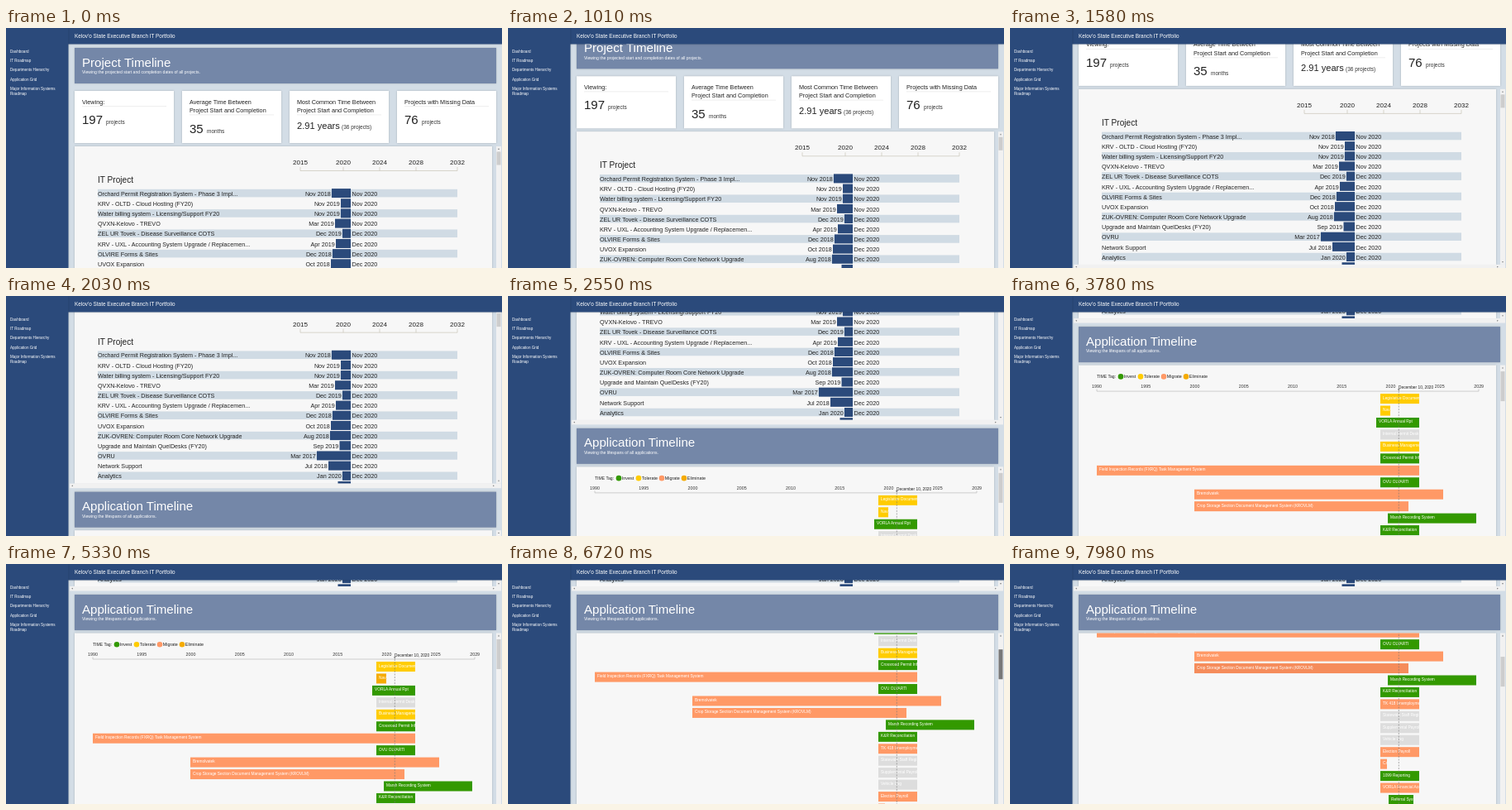
Recreate the animation shown at these times as an HTML page. Size 600 by 290 pixels, loop 8000 ms.

```html
<!DOCTYPE html>
<html lang="en">
<head>
<meta charset="utf-8">
<title>Portfolio timeline</title>
<style>
html, body { margin: 0; width: 600px; height: 290px; overflow: hidden; background: #d3dde6; }
svg { display: block; font-family: "Liberation Sans", Arial, sans-serif; }
.card { filter: drop-shadow(0 .6px .8px #0003); }
</style>
</head>
<body>
<svg id="stage" width="600" height="290" viewBox="0 0 600 290"></svg>
<script>
const NAVY = '#2b4a7b', INK = '#222', PALE = '#d0dbe4', THUMB = '#cdcdcd';
const GREEN = '#339900', YELLOW = '#ffcc00', ORANGE = '#ff9966', GREY = '#dddddd', AMBER = '#f5ab00';

const esc = s => s.replace(/&/g, '&amp;');
const rect = (x, y, w, h, fill, extra = '') =>
  `<rect x="${x}" y="${y}" width="${w}" height="${h}" fill="${fill}" ${extra}/>`;
const text = (x, y, size, s, fill = INK, anchor = 'start') =>
  `<text x="${x}" y="${y}" font-size="${size}" fill="${fill}" text-anchor="${anchor}">${esc(s)}</text>`;
const path = (d, stroke, width = .7, extra = '') =>
  `<path d="${d}" fill="none" stroke="${stroke}" stroke-width="${width}" ${extra}/>`;
const tri = (x, y, dx, dy) => // arrowhead pointing along (dx, dy)
  `<path d="M${x + dx} ${y + dy}L${x - dx + dy} ${y - dy + dx}L${x - dx - dy} ${y - dy - dx}z" fill="#777"/>`;
const clip = (x, y, w, h, body, vy = y) =>
  `<svg x="${x}" y="${y}" width="${w}" height="${h}" viewBox="${x} ${vy} ${w} ${h}">${body}</svg>`;

function banner(y, title, sub) {
  return rect(83, y, 510, 43, '#7487a8', 'class="card"') +
    text(92, y + 22.6, 15.1, title, '#fff') + text(92, y + 31.4, 5.12, sub, '#fff');
}

function card(x, lines, big, size, unit, gap) {
  const end = 91.6 + 10.3 * (lines.length - 1), base = end + (size < 15 ? 19.6 : 24.6);
  return rect(x, 76, 120, 63, '#fff', 'class="card"') +
    lines.map((s, i) => text(x + 9, 91.6 + 10.3 * i, 7.25, s)).join('') +
    path(`M${x + 9} ${end + 3}h102`, '#ddd', .5) +
    text(x + 9, base, size, big) + text(x + gap, base, 6.5, unit, '#333');
}

const projects = [
  ['Orchard Permit Registration System - Phase 3 Impl...', 'Nov 2018', 394],
  ['KRV - OLTD - Cloud Hosting (FY20)', 'Nov 2019', 405],
  ['Water billing system - Licensing/Support FY20', 'Nov 2019', 405],
  ['QVXN-Kelovo - TREVO', 'Mar 2019', 398],
  ['ZEL UR Tovek - Disease Surveillance COTS', 'Dec 2019', 407],
  ['KRV - UXL - Accounting System Upgrade / Replacemen...', 'Apr 2019', 399],
  ['OLVIRE Forms & Sites', 'Dec 2018', 395],
  ['UVOX Expansion', 'Oct 2018', 393],
  ['ZUK-OVREN: Computer Room Core Network Upgrade', 'Aug 2018', 392],
  ['Upgrade and Maintain QuelDesks (FY20)', 'Sep 2019', 403.5],
  ['OVRU', 'Mar 2017', 376],
  ['Network Support', 'Jul 2018', 390],
  ['Analytics', 'Jan 2020', 407],
  ['Data Services', 'Jul 2019', 401.5]
];

function projectChart() {
  const ticks = [[2015, 356], [2020, 408], [2024, 452], [2028, 496], [2032, 546]];
  let out = rect(83, 143, 505, 212, '#f7f7f7') + text(111, 186.9, 10.1, 'IT Project') +
    path('M356 172.5H546', '#c9c5b8') +
    ticks.map(([y, x]) => text(x, 165, 8.1, y + '', INK, 'middle') + path(`M${x} 168v4.5`, '#c9c5b8')).join('');
  projects.forEach(([name, start, x], i) => {
    const y = 194.8 + 12.17 * i;
    if (i % 2 == 0) out += rect(111, y, 435, 9.6, PALE);
    out += rect(x, y - .7, 417 - x, 11, NAVY) + text(111, y + 8, 7.2, name) +
      text(x - 1.3, y + 8, 7.2, start, INK, 'end') +
      text(418.5, y + 8, 7.2, i < 4 ? 'Nov 2020' : 'Dec 2020');
  });
  return out;
}

const apps = [
  ['Legislative Documents', YELLOW, 448, 495],
  ['Nav Log', YELLOW, 448, 460],
  ['VORLA Annual Rpt', GREEN, 443, 495],
  ['Internal Permit Desk', GREY, 448, 495],
  ['Business Management', YELLOW, 448, 495],
  ['Crossroad Permit Info', GREEN, 448, 495],
  ['Field Inspection Records (FXRQ) Task Management System', ORANGE, 105, 495],
  ['OVU OLVARTI', GREEN, 448, 495],
  ['Bremolvatek', ORANGE, 223, 524],
  ['Crop Storage Section Document Management System (KROVLM)', ORANGE, 223, 482],
  ['Marsh Recording System', GREEN, 457, 564],
  ['K&R Reconciliation', GREEN, 448, 495],
  ['TK 418 Unemployment', ORANGE, 448, 495],
  ['Statewide Staff Register', GREY, 448, 495],
  ['Supplemental Payroll', GREY, 448, 495],
  ['Vehicle Log', GREY, 448, 495],
  ['Election Payroll', ORANGE, 448, 495],
  ['Calls', ORANGE, 448, 456],
  ['1099 Reporting', GREEN, 448, 495],
  ['VORLA Financial Acct', ORANGE, 448, 495],
  ['Referral System', GREEN, 458, 488],
  ['Asset Records', GREEN, 448, 495]
];

function appChart() {
  const tags = [['Invest', GREEN, 134], ['Tolerate', YELLOW, 158], ['Migrate', ORANGE, 186], ['Eliminate', AMBER, 213]];
  const ticks = [1990, 1995, 2000, 2005, 2010, 2015, 2020, 2025, 2029];
  let out = text(105, 99.2, 5.1, 'TIME Tag:') +
    tags.map(([s, c, x]) => `<circle cx="${x}" cy="97.3" r="3.3" fill="${c}"/>` + text(x + 3.8, 99.2, 5.4, s)).join('') +
    path('M105 112.5V115H567V112.5', '#bbb') +
    ticks.map(y => text(105 + (y - 1990) * 11.85, 111.2, 5.3, y + '', '#333', 'middle')).join('') +
    text(470, 111.8, 4.8, 'December 10, 2020');
  apps.forEach(([name, color, a, b], i) => {
    const y = 118 + 14.45 * i;
    out += rect(a, y, b - a, 12, color, `id="app${i}"`) +
      clip(a, y, b - a, 12, text(a + 3, y + 6.5, 4.8, name, '#fff'));
  });
  return out + path('M470.3 115V600', '#777', .6, 'stroke-dasharray="2 1.5"') + tri(470.3, 113.5, 0, 1.3);
}

// Scrollbar gutter on the right of a panel whose top is at y
const bar = (y, h) => rect(593, y, 6, h, '#f1f1f1') + tri(596, y + 3, 0, -.9);

const menu = [['Dashboard', 29.6], ['IT Roadmap', 40.7], ['Departments Hierarchy', 52.1], ['Application Grid', 63.5],
  ['Major Information Systems', 74.7], ['Roadmap', 81]];

const stage = document.getElementById('stage');
stage.innerHTML = rect(0, 0, 600, 290, '#d3dde6') + '<g id="page">' +
  banner(24, 'Project Timeline', 'Viewing the projected start and completion dates of all projects.') +
  card(83, ['Viewing:'], '197', 15, 'projects', 38) +
  card(213, ['Average Time Between', 'Project Start and Completion'], '35', 15, 'months', 30) +
  card(343, ['Most Common Time Between', 'Project Start and Completion'], '2.91 years', 11.1, '(36 projects)', 63) +
  card(473, ['Projects with Missing Data'], '76', 15, 'projects', 30) +
  rect(83, 143, 505, 212, '#f7f7f7', 'class="card"') +
  clip(83, 143, 505, 212, projectChart()) +
  bar(143, 212) + rect(593.5, 149.5, 5, 16, THUMB) + tri(596, 352, 0, .9) +
  rect(77, 355, 522, 5.5, '#f1f1f1') + tri(80, 357.7, -.9, 0) + tri(590, 357.7, .9, 0) +
  banner(365, 'Application Timeline', 'Viewing the lifespans of all applications.') +
  rect(83, 411.5, 505, 400, '#f7f7f7', 'class="card"') +
  clip(83, 411.5, 505, 400, `<g id="chart">${appChart()}</g>`, 83.5) +
  bar(411.5, 400) + rect(593.5, 419, 5, 36, THUMB, 'id="thumb"') + '</g>' +
  rect(0, 0, 600, 19.5, NAVY, 'class="card"') + rect(0, 0, 75.5, 290, NAVY, 'class="card"') +
  text(83, 11.5, 6.4, "Kelov'o State Executive Branch IT Portfolio", '#fff') +
  menu.map(([s, y]) => text(5, y, 4.6, s, '#fff')).join('');

// Keys are [time, value, slope], joined by cubic Hermite curves
function curve(keys, t) {
  if (t <= keys[0][0]) return keys[0][1];
  for (let i = 1; i < keys.length; i++) {
    const [t0, a, m] = keys[i - 1], [t1, b, n] = keys[i];
    if (t > t1) continue;
    const d = t1 - t0, u = (t - t0) / d, v = 1 - u;
    return a * v * v * (1 + 2 * u) + m * d * u * v * v + b * u * u * (3 - 2 * u) - n * d * u * u * v;
  }
  return keys[keys.length - 1][1];
}

const pageScroll = [[500, 0, 0], [1580, 69, .11], [2550, 205, .14], [3170, 287, .11], [3810, 328, 0]];
const chartScroll = [[6180, 0, 0], [6720, 74, .12], [7580, 128, 0]];
const [page, chart, thumb, app1, app9] = ['page', 'chart', 'thumb', 'app1', 'app9'].map(id => document.getElementById(id));

function draw() {
  const t = performance.now() % 8000, inner = curve(chartScroll, t);
  page.setAttribute('transform', `translate(0 ${-curve(pageScroll, t)})`);
  chart.setAttribute('transform', `translate(0 ${-inner})`);
  thumb.setAttribute('y', 419 + inner * .165);
  thumb.setAttribute('fill', t < 5840 || t > 7600 ? THUMB : t < 6180 ? '#a8a8a8' : '#787878');
  app1.setAttribute('fill', t >= 5330 && t < 5840 ? AMBER : YELLOW);
  app9.setAttribute('fill', t < 7780 ? ORANGE : '#f58c5b');
  requestAnimationFrame(draw);
}
draw();
</script>
</body>
</html>
```
